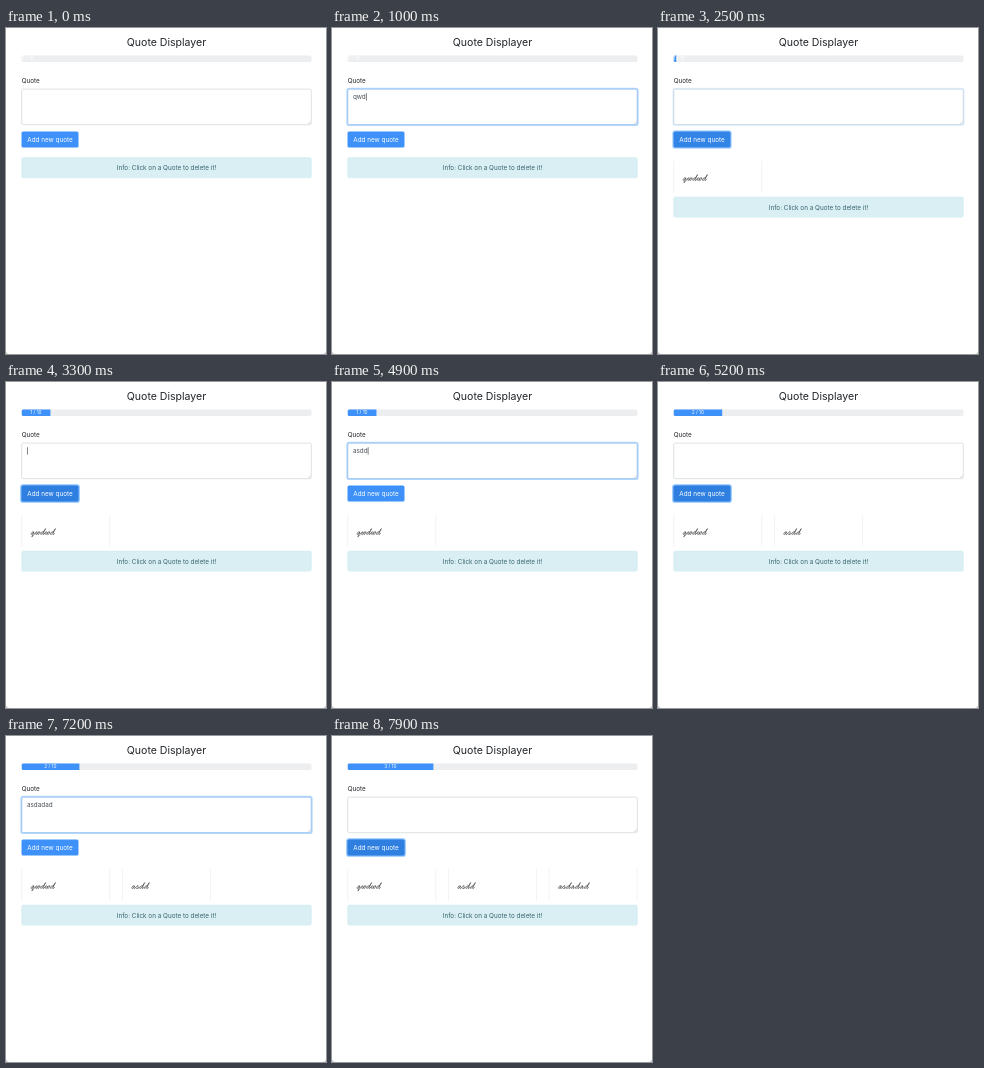
An HTML page for the animation above (8000 ms loop, 320 by 326 pixels).

```html
<!DOCTYPE html>
<html lang="en">
<head>
<meta charset="utf-8">
<title>Quote Displayer</title>
<style>
html, body { margin: 0; width: 100%; height: 100%; overflow: hidden; background: #fff; }
svg { display: block; width: 320px; height: 326px; font: 6.35px Inter, sans-serif; }
.mid { text-anchor: middle; }
.halo { fill: none; stroke: #007bff; stroke-opacity: .27; stroke-width: 1.4; }
.pen { fill: none; stroke: #333; stroke-width: .6; stroke-linecap: round; stroke-linejoin: round; }
.edge { stroke: #eee; stroke-width: .7; }
</style>
</head>
<body>
<svg viewBox="0 0 320 326">
  <path d="M0 322V326H4A4 4 0 0 1 0 322M320 322V326H316A4 4 0 0 0 320 322" fill="#ccc"/>
  <text class="mid" x="160.5" y="18" font-size="10.55" fill="#212529">Quote Displayer</text>

  <clipPath id="track"><rect x="15.5" y="27.4" width="290" height="6.5" rx="1.6"/></clipPath>
  <g clip-path="url(#track)">
    <rect x="15" y="27" width="291" height="8" fill="#edeef0"/>
    <rect id="bar" x="15.5" y="27" height="8" fill="#3d91f8"/>
    <text id="count" y="32.4" font-size="4.8" fill="#fff"></text>
  </g>

  <text x="15.7" y="54.8" fill="#212529">Quote</text>
  <rect id="fieldHalo" class="halo" x="15" y="60.4" width="291" height="37" rx="2.2"/>
  <rect x="15.7" y="61.1" width="289.6" height="35.6" rx="1.6" fill="#fff" stroke="#d0d4d9" stroke-width=".7"/>
  <rect id="fieldEdge" x="15.7" y="61.1" width="289.6" height="35.6" rx="1.6" fill="none" stroke="#80bdff" stroke-width=".7"/>
  <path d="M302 96L304.7 93.3M303.6 96L304.7 94.9" stroke="#aaa" stroke-width=".4"/>
  <text id="typed" x="20.9" y="71.3" fill="#495057"></text>
  <rect id="caret" y="65.2" width=".6" height="7.4" fill="#333"/>

  <rect id="btnHalo" class="halo" style="stroke-opacity:.45" x="14.9" y="102.9" width="58.2" height="17.2" rx="2.2"/>
  <rect x="15.5" y="103.5" width="57" height="16" rx="1.6" fill="#3d91f8"/>
  <rect id="btnHover" x="15.5" y="103.5" width="57" height="16" rx="1.6" fill="#2f7fe0"/>
  <text class="mid" x="44" y="113.8" fill="#fff">Add new quote</text>

  <g id="cards"></g>
  <g id="info">
    <rect x="15.7" y="129.6" width="289.6" height="20.2" rx="1.6" fill="#daeff4" stroke="#cce9ef" stroke-width=".5"/>
    <text class="mid" x="160.5" y="142.2" fill="#37636d">Info: Click on a Quote to delete it!</text>
  </g>
</svg>
<script>
const LOOP = 8000, FRAME = 100, STEP = 28.95;
const $ = id => document.getElementById(id);

// [time, text in the field, caret blink lead]
const keys = [
  [0, ''], [500, ''], [900, 'qw'], [1000, 'qwd'], [1300, 'qwdwd'], [2500, ''],
  [3300, ''], [3500, 'as'], [3700, 'asd'], [3900, 'asdd', 100], [5000, ''],
  [5900, ''], [6100, 'a'], [6200, 'as'], [6300, 'asda'], [6400, 'asdad'],
  [6600, 'asdada'], [6700, 'asdadad'], [7500, '']
];
// [time, field has focus]
const focus = [[-1000, 0], [450, 1], [2440, 0], [3300, 1], [4950, 0], [5860, 1], [7440, 0]];
const quotes = [[2440, 'qwdwd'], [4960, 'asdd'], [7440, 'asdadad']];

// Handwriting: [advance, pen stroke]
const bowl = 'M3.2-2.8C1.8-3.5 .3-1.4 .5-.4C.7 .5 2.4-1 3.2-2.6';
const pen = {
  a: [4.4, bowl + 'C2.7-1.4 2.3-.3 2.7 0C3.2 .2 4-.7 4.4-1.2'],
  d: [4.6, bowl + 'L5.4-6C4.2-3.6 2.5-.4 2.9 0C3.3 .2 4.2-.7 4.6-1.2'],
  q: [4.4, bowl + 'L1.3 2.3C1.2 2.7 2.5 .8 4.4-1.2'],
  s: [3.6, 'M0-1.2L2.2-3.2C2-2.2 2.8-1.2 2.2-.4C1.8 .1 .9 .1 .5-.3M2.2-.4C2.8-.5 3.3-.9 3.6-1.2'],
  w: [5.2, 'M0-1.2L1.6-3C1-1.4 .6-.2 1.1 0C1.7 .1 2.8-1.6 3.4-2.9C2.8-1.4 2.5-.2 3 0C3.8 .1 4.9-1.8 4.7-3C4.6-2.2 5-2 5.2-1.9']
};

function write(word, x, y) {
  return [...word].map(c => {
    const [advance, d] = pen[c];
    const stroke = `<path d="${d}" transform="translate(${x} ${y})"/>`;
    x += advance;
    return stroke;
  }).join('');
}

$('cards').innerHTML = quotes.map(([, word], i) => {
  const x = 15.7 + i * 100.7;
  return `<g><path class="edge" d="M${x} 133V165M${x + 88} 133V165"/>
    <g class="pen" role="img" aria-label="${word}">${write(word, x + 8.9, 152.6)}</g></g>`;
}).join('');

// CSS "ease": cubic-bezier(.25, .1, .25, 1)
function ease(p) {
  if (p <= 0) return 0;
  if (p >= 1) return 1;
  const curve = (a, b, s) => 3 * a * s * (1 - s) ** 2 + 3 * b * s * s * (1 - s) + s ** 3;
  let lo = 0, hi = 1;
  for (let i = 0; i < 20; i++) {
    const s = (lo + hi) / 2;
    if (curve(.25, .25, s) < p) lo = s; else hi = s;
  }
  return curve(.1, 1, lo);
}

const latest = (table, t) => table.filter(row => row[0] <= t).pop();
const show = (el, on) => el.setAttribute('opacity', +on);

function draw(t) {
  const [since, focused] = latest(focus, t);
  const fade = ease((t - since) / 150);
  const glow = focused ? fade : since < 0 ? 0 : 1 - fade;
  const active = t < quotes[0][0] ? 0 : 1 - glow;
  show($('fieldHalo'), glow);
  show($('fieldEdge'), glow);
  show($('btnHalo'), active);
  show($('btnHover'), active);

  const [keyTime, text, lead = 0] = latest(keys, t);
  const typed = $('typed');
  typed.textContent = text;
  $('caret').setAttribute('x', 21.1 + (text ? typed.getComputedTextLength() : 0));
  show($('caret'), focused && (t - keyTime + lead) % 1000 < 500);

  const total = quotes.filter(q => q[0] <= t).length;
  const width = quotes.reduce((sum, q) => sum + STEP * ease((t - q[0]) / 600), 0);
  const count = $('count');
  $('bar').setAttribute('width', width);
  count.textContent = total + ' / 10';
  const half = count.getComputedTextLength() / 2;
  count.setAttribute('x', 15.5 + Math.max(0, width / 2 - half));

  [...$('cards').children].forEach((card, i) => show(card, i < total));
  $('info').setAttribute('transform', `translate(0 ${total ? 39.4 : 0})`);
}

const start = performance.now();
function tick() {
  const t = (performance.now() - start) % LOOP;
  draw(Math.floor(t / FRAME) * FRAME);
  requestAnimationFrame(tick);
}
tick();
</script>
</body>
</html>
```
